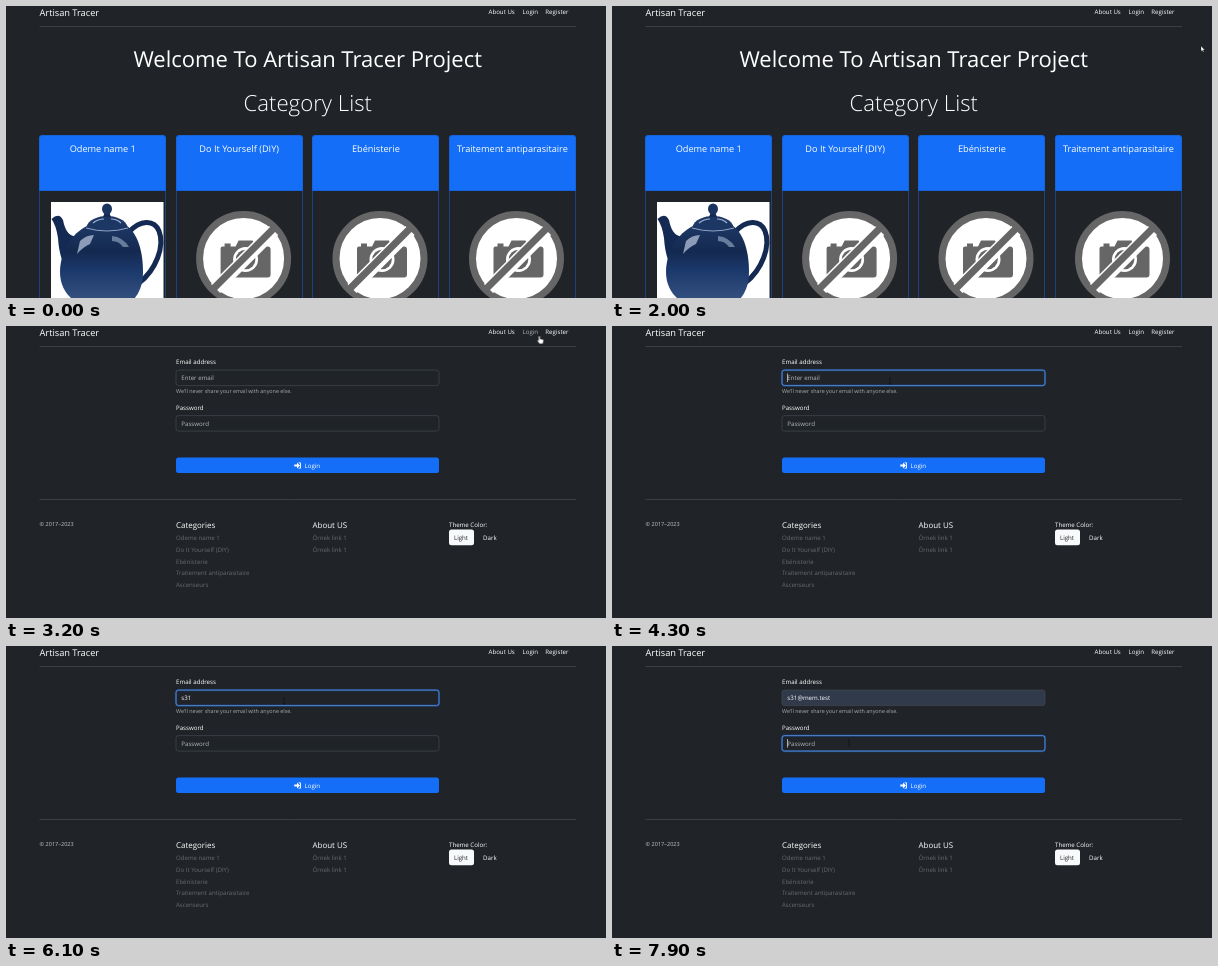
These frames come from a looping animation (600x292 px, 8000 ms). An HTML page:

```html
<!DOCTYPE html>
<html lang="en">
<head>
<meta charset="utf-8">
<title>Artisan Tracer</title>
<style>
html, body { margin: 0; width: 100%; height: 100%; overflow: hidden; background: #202428; }
svg { display: block; }
text {
  font: 500 6.15px "Open Sans", "Noto Sans", sans-serif;
  fill: #fff; text-rendering: geometricPrecision; white-space: pre;
}
.mid { text-anchor: middle; }
.brand { font-size: 9.25px; }
.title { font-size: 22px; font-weight: 450; }
.lead { font-size: 22.2px; font-weight: 300; }
.card { font-size: 9.2px; }
.help { font-size: 5.4px; fill: #a9acaf; }
.hint { fill: #b5b8bb; }
.small { font-size: 5.55px; fill: #c4c7c9; }
.head { font-size: 7.95px; }
.link { font-size: 6.1px; fill: #676b6f; }
.rule { stroke: #43474b; stroke-width: .8; }
.field { fill: #202428; stroke: #495057; stroke-width: .6; }
.ring { fill: none; stroke: #0d6efd; stroke-opacity: .34; stroke-width: 2.2; }
.edge { fill: none; stroke: #6497e2; stroke-width: .7; }
.caret { fill: #fff; }

/* Every state switch shares one 8 s clock: 1% = 80 ms. */
.sw { animation: 8s step-end infinite; }
.home { animation-name: home; }
.login { animation-name: login; }
.hover { animation-name: hover; }
.mailfocus { animation-name: mailfocus; }
.mailhint { animation-name: mailhint; }
.k1 { animation-name: k1; }
.k2 { animation-name: k2; }
.k3 { animation-name: k3; }
.rest { animation-name: rest; }
.fill { animation-name: fill; }
.passfocus { animation-name: passfocus; }
.blink { animation-name: blink; }
.arrow { animation-name: arrow; }
.hand { animation-name: hand; }
.beam { animation-name: beam; }
.move { animation: move 8s linear infinite; }

@keyframes home { 0% { opacity: 1 } 40%, 100% { opacity: 0 } }
@keyframes login { 0% { opacity: 0 } 40%, 100% { opacity: 1 } }
@keyframes hover { 0% { fill: #fff } 36.25% { fill: #adb0b3 } 51.25%, 100% { fill: #fff } }
@keyframes mailfocus { 0% { opacity: 0 } 51.25% { opacity: 1 } 92.5%, 100% { opacity: 0 } }
@keyframes mailhint { 0% { opacity: 1 } 62.5%, 100% { opacity: 0 } }
@keyframes k1 { 0% { opacity: 0 } 62.5%, 100% { opacity: 1 } }
@keyframes k2 { 0% { opacity: 0 } 65%, 100% { opacity: 1 } }
@keyframes k3 { 0% { opacity: 0 } 70%, 100% { opacity: 1 } }
@keyframes rest { 0% { opacity: 0 } 82.5%, 100% { opacity: 1 } }
@keyframes fill { 0% { fill: #202428 } 85%, 100% { fill: #303a4b } }
@keyframes passfocus { 0% { opacity: 0 } 92.5%, 100% { opacity: 1 } }
@keyframes blink {
  0% { opacity: 0; transform: none }
  52.5% { opacity: 1; transform: none }
  58.75% { opacity: 0; transform: none }
  62.5% { opacity: 1; transform: translateX(3px) }
  65% { opacity: 1; transform: translateX(6.6px) }
  70% { opacity: 1; transform: translateX(10.2px) }
  76.25%, 100% { opacity: 0; transform: none }
}
@keyframes arrow { 0% { opacity: 0 } 23.75% { opacity: 1 } 35% { opacity: 0 } 42.5% { opacity: 1 } 46.25%, 100% { opacity: 0 } }
@keyframes hand { 0% { opacity: 0 } 35% { opacity: 1 } 42.5%, 100% { opacity: 0 } }
@keyframes beam { 0% { opacity: 0 } 46.25%, 100% { opacity: 1 } }
@keyframes move {
  0%, 23.75% { transform: translate(589.5px, 43px) }
  25%, 28% { transform: translate(589px, 40px) }
  33.75% { transform: translate(556px, 17px) }
  36.25%, 41.25% { transform: translate(532.3px, 10px) }
  45% { transform: translate(328px, 70px) }
  48.75%, 85% { transform: translate(278px, 55px) }
  92%, 100% { transform: translate(237px, 97px) }
}
</style>
</head>
<body>
<svg width="600" height="292" viewBox="0 0 600 292">
  <defs>
    <linearGradient id="glaze" x2="0" y2="1">
      <stop offset="0" stop-color="#1d3765"/>
      <stop offset=".35" stop-color="#14294f"/>
      <stop offset=".6" stop-color="#1b386b"/>
      <stop offset="1" stop-color="#34507f"/>
    </linearGradient>
    <g id="frame">
      <path d="M.5 164V3Q.5.5 3 .5H124Q126.5.5 126.5 3V164" fill="none" stroke="#1b4384"/>
      <path d="M.5 55.5V3Q.5.5 3 .5H124Q126.5.5 126.5 3V55.5Z" fill="#146ef8" stroke="#1763da"/>
    </g>
    <g id="nophoto">
      <circle r="44" fill="#fff" stroke="#666" stroke-width="7"/>
      <path d="M-21-12H-19V-15H-13V-12H-8L-5-18H9L12-12H24Q27-12 27-9V16Q27 19 24 19H-20Q-23 19-23 16V-10Q-23-12-21-12Z" fill="#666"/>
      <circle cx="2" cy="1" r="12.5" fill="#fff"/>
      <circle cx="2" cy="1" r="9.8" fill="#666"/>
      <path d="M-4 1A6 6 0 0 1 2-5" fill="none" stroke="#fff" stroke-width="2"/>
      <path d="M30-28L-28 30" stroke="#fff" stroke-width="13"/>
      <path d="M31-31L-31 31" stroke="#666" stroke-width="7"/>
    </g>
    <rect id="box" x="170" width="263" height="15.5" rx="2.5"/>
  </defs>

  <text class="brand" x="33.5" y="9.8">Artisan Tracer</text>
  <text x="482.5" y="8.4">About Us</text>
  <text class="sw hover" x="516.5" y="8.4">Login</text>
  <text x="539.3" y="8.4">Register</text>
  <path class="rule" d="M33.5 20.5H570"/>

  <g class="sw home">
    <text class="title mid" x="301.7" y="61">Welcome To Artisan Tracer Project</text>
    <text class="lead mid" x="301.7" y="105.2">Category List</text>

    <use href="#frame" x="33" y="129"/>
    <use href="#frame" x="170" y="129"/>
    <use href="#frame" x="306" y="129"/>
    <use href="#frame" x="443" y="129"/>
    <g class="mid">
      <text class="card" x="96.7" y="146.2">Odeme name 1</text>
      <text class="card" x="233.2" y="146.2">Do It Yourself (DIY)</text>
      <text class="card" x="369.9" y="146.2">Ebénisterie</text>
      <text class="card" x="506.4" y="146.2">Traitement antiparasitaire</text>
    </g>

    <rect x="45" y="196" width="112.5" height="97" fill="#fff"/>
    <path d="M123 226C134 214 148 213 153 225C159 240 150 264 133 277" fill="none" stroke="#142a52" stroke-width="5"/>
    <path d="M45.5 213Q53 206 57 214C59 224 62 229 70 231L66 268C57 262 53 248 52 232Q50 219 45.5 213Z" fill="#142a52"/>
    <path d="M81 220C66 227 54 246 54 266C54 278 59 287 66 293H128C134 286 137 277 137 266C137 246 132 228 121 220Z" fill="url(#glaze)"/>
    <path d="M80 222C82 213 93 210 101 210S120 213 122 222Q101 227 80 222Z" fill="#1d3765"/>
    <path d="M80 222Q101 228 122 222" fill="none" stroke="#8fa3c2" stroke-width="1"/>
    <path d="M97 211L99 206H103L105 211Z" fill="#142a52"/>
    <ellipse cx="101" cy="203" rx="5" ry="5.5" fill="#1a3460"/>
    <path d="M74 235Q80 229 88 229L84 238Q77 241 71 248Z" fill="#b4c2d8" opacity=".75"/>
    <path d="M106 230Q117 231 123 241L117 241Q113 235 106 235Z" fill="#9fb0cc" opacity=".6"/>
    <path d="M87 217Q92 213 98 213M105 213Q111 213 115 217" fill="none" stroke="#9fb2d0" stroke-width="1.2"/>

    <use href="#nophoto" x="237.6" y="252.5"/>
    <use href="#nophoto" x="374" y="252.5"/>
    <use href="#nophoto" x="510.5" y="252.5"/>
  </g>

  <g class="sw login">
    <text x="170" y="38.4">Email address</text>
    <use href="#box" y="44.1" class="field sw fill"/>
    <g class="sw mailfocus">
      <use href="#box" y="44.1" class="ring"/>
      <use href="#box" y="44.1" class="edge"/>
    </g>
    <text class="hint sw mailhint" x="175.3" y="54.2">Enter email</text>
    <g>
      <text class="sw k1" x="175.3" y="54.2">s</text>
      <text class="sw k2" x="178.3" y="54.2">3</text>
      <text class="sw k3" x="181.8" y="54.2">1</text>
      <text class="sw rest" x="185.4" y="54.2">@mem.test</text>
    </g>
    <rect class="caret sw blink" x="175" y="47.5" width=".6" height="8.5"/>
    <text class="help" x="170" y="67.2">We'll never share your email with anyone else.</text>

    <text x="170" y="84">Password</text>
    <use href="#box" y="89.6" class="field"/>
    <text class="hint" x="175.3" y="99.8">Password</text>
    <g class="sw passfocus">
      <use href="#box" y="89.6" class="ring"/>
      <use href="#box" y="89.6" class="edge"/>
      <rect class="caret" x="175" y="93" width=".6" height="8.5"/>
    </g>

    <use href="#box" y="131.6" fill="#146ef8"/>
    <path d="M288.3 138.4H291V136.6L294 139.5L291 142.4V140.6H288.3Z" fill="#fff"/>
    <path d="M292.6 136.8H294.5V142.2H292.6" fill="none" stroke="#fff" stroke-width=".9" stroke-linejoin="round"/>
    <text x="298.5" y="141.8">Login</text>

    <path class="rule" d="M33.5 173.5H570"/>
    <text class="small" x="33.5" y="200">© 2017–2023</text>
    <text class="head" x="170" y="201.8">Categories</text>
    <text class="link" x="170" y="214.3">Odeme name 1</text>
    <text class="link" x="170" y="226">Do It Yourself (DIY)</text>
    <text class="link" x="170" y="237.7">Ebénisterie</text>
    <text class="link" x="170" y="249.3">Traitement antiparasitaire</text>
    <text class="link" x="170" y="261">Ascenseurs</text>
    <text class="head" x="306.5" y="201.8">About US</text>
    <text class="link" x="306.5" y="214.3">Örnek link 1</text>
    <text class="link" x="306.5" y="226">Örnek link 1</text>
    <text x="443" y="201.2">Theme Color:</text>
    <rect x="443" y="203.6" width="25" height="15.6" rx="2.5" fill="#f8f9fa"/>
    <text x="448" y="213.9" style="fill:#212529">Light</text>
    <text x="477" y="213.9">Dark</text>
  </g>

  <g class="move">
    <path class="sw arrow" d="M0 0V5.2L1.2 4.2L2 6L2.9 5.6L2.1 3.9H3.7Z" fill="#fff" stroke="#111" stroke-width=".3"/>
    <path class="sw hand" d="M.3.5Q1-.3 1.8.5V2.9L4.7 3.6Q5.4 3.9 5.2 5L4.5 7.8H1.2L-1 4.8Q-.8 3.8.3 4.6Z" fill="#fff" stroke="#111" stroke-width=".3"/>
    <path class="sw beam" d="M-.9-3H.9M0-3V3M-.9 3H.9" fill="none" stroke="#0c0e10" stroke-width=".6"/>
  </g>
</svg>
</body>
</html>
```
